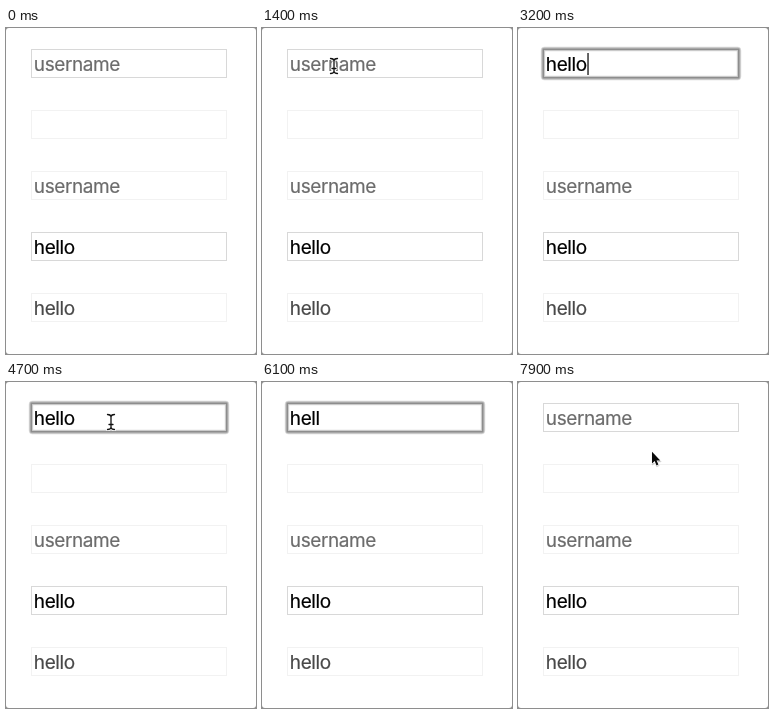
Animation, 250 px wide and 326 px high, one loop 8000 ms. Source, as an HTML page:

```html
<!DOCTYPE html>
<html lang="en">
<head>
<meta charset="utf-8">
<title>Text fields</title>
<style>
html, body { margin: 0; width: 100%; height: 100%; overflow: hidden; background: #8c8c8c; }
svg { display: block; width: 250px; height: 326px; }
text { font: 19px Inter, Roboto, "Liberation Sans", sans-serif; letter-spacing: -.4px; fill: #000; stroke: #000; stroke-width: .2px; }
.box { fill: #fff; stroke: #d8d8d8; }
.off { stroke: #f2f2f2; }
.hint { fill: #6c6c6c; stroke: #6c6c6c; }
.dim { fill: #484848; stroke: #484848; }
#ring { fill: none; stroke: #000; }
</style>
</head>
<body>
<svg viewBox="0 0 250 326">
  <defs>
    <path id="bar" d="M-3.5 -7.5Q-.5 -7.5 0 -5.5Q.5 -7.5 3.5 -7.5M0 -5.5V5.5M-3.5 7.5Q-.5 7.5 0 5.5Q.5 7.5 3.5 7.5M-2 2.5H2"/>
    <path id="tip" d="M0 0V11.8L2.7 9.3L4.5 13.6L6.4 12.8L4.6 8.6H8.3Z"/>
  </defs>
  <rect width="250" height="326" rx="3" fill="#fff"/>
  <rect class="box" x="25.5" y="21.5" width="195" height="28"/>
  <rect class="box off" x="25.5" y="82.5" width="195" height="28"/>
  <rect class="box off" x="25.5" y="143.5" width="195" height="28"/>
  <rect class="box" x="25.5" y="204.5" width="195" height="28"/>
  <rect class="box off" x="25.5" y="265.5" width="195" height="28"/>
  <g id="ring">
    <rect x="25" y="21" width="196" height="29" rx="1.5" stroke-width="4.4" stroke-opacity=".16"/>
    <rect x="25" y="21" width="196" height="29" rx="1" stroke-width="2.4" stroke-opacity=".22"/>
  </g>
  <text id="value" x="27.8" y="43"></text>
  <text class="hint" x="27.8" y="165">username</text>
  <text x="27.8" y="226">hello</text>
  <text class="dim" x="27.8" y="287">hello</text>
  <rect id="caret" y="25" width="1.2" height="22"/>
  <g id="beam" fill="none" stroke-linecap="round">
    <use href="#bar" stroke="#fff" stroke-width="3"/>
    <use href="#bar" stroke="#111" stroke-width="1.3"/>
  </g>
  <g id="arrow" stroke-linejoin="round">
    <use href="#tip" x=".4" y="1" fill="#0003" stroke="#0002" stroke-width="1.5"/>
    <use href="#tip" fill="#0a0a0a" stroke="#fff" stroke-width="1.2" paint-order="stroke"/>
  </g>
</svg>
<script>
const LOOP = 8000, STEP = 100, WORD = 'hello';
const $ = id => document.getElementById(id);
const within = (t, a, b) => t >= a && t < b;
const show = (el, on) => el.setAttribute('visibility', on ? 'visible' : 'hidden');

// Pointer strokes: key points of [ms, x, y], joined by straight moves.
const strokes = [
  { hide: 2500, path: [[300, 139, 213], [800, 99, 26], [900, 93, 46], [1200, 84, 43], [1400, 72, 38]] },
  { hide: 6100, path: [[4100, 76, 38], [4700, 105, 40], [5000, 228, 87], [5400, 177, 77], [5700, 116, 38]] },
  { hide: LOOP, path: [[7300, 113, 42], [7400, 138, 80], [7600, 134, 69.8]] }
];

function pointer(t) {
  const stroke = strokes.find(s => within(t, s.path[0][0], s.hide));
  if (!stroke) return null;
  const i = stroke.path.findLastIndex(p => p[0] <= t);
  const [t0, x0, y0] = stroke.path[i];
  const [t1, x1, y1] = stroke.path[i + 1] || [LOOP, x0, y0];
  const k = (t - t0) / (t1 - t0);
  return { x: x0 + (x1 - x0) * k, y: y0 + (y1 - y0) * k };
}

function letters(t) {
  if (t < 2500) return 0;
  if (t < 6100) return Math.min(WORD.length, 1 + Math.round((t - 2500) / 175));
  return Math.max(0, WORD.length - 1 - Math.floor((t - 6100) / 165));
}

// The ring fades in over two steps and vanishes at once on blur.
function focus(t) {
  const start = within(t, 1500, 5200) ? 1400 : within(t, 5700, 7500) ? 5600 : t;
  return Math.min(1, (t - start) / 200);
}

// Blinking restarts on focus and after the last key of a run.
function caretLit(t) {
  if (!focus(t) || within(t, 6100, 6800)) return false;
  const since = [1500, 3200, 5700, 6800].findLast(s => s <= t);
  return within(t, 2500, 3200) || (t - since) % 1000 < 500;
}

function draw(t) {
  const value = $('value'), text = WORD.slice(0, letters(t)), p = pointer(t);
  value.textContent = text || 'username';
  value.setAttribute('class', text ? '' : 'hint');
  $('ring').setAttribute('opacity', focus(t));
  $('caret').setAttribute('x', 28 + (text ? value.getComputedTextLength() + .5 : 0));
  show($('caret'), caretLit(t));
  const beam = p && (p.y < 50 || p.y > 204);
  show($('beam'), beam);
  show($('arrow'), p && !beam);
  if (p) $(beam ? 'beam' : 'arrow').setAttribute('transform', `translate(${p.x} ${p.y})`);
}

const start = performance.now();
function tick() {
  const t = (performance.now() - start) % LOOP;
  draw(Math.floor(t / STEP) * STEP);
  requestAnimationFrame(tick);
}
tick();
</script>
</body>
</html>
```
